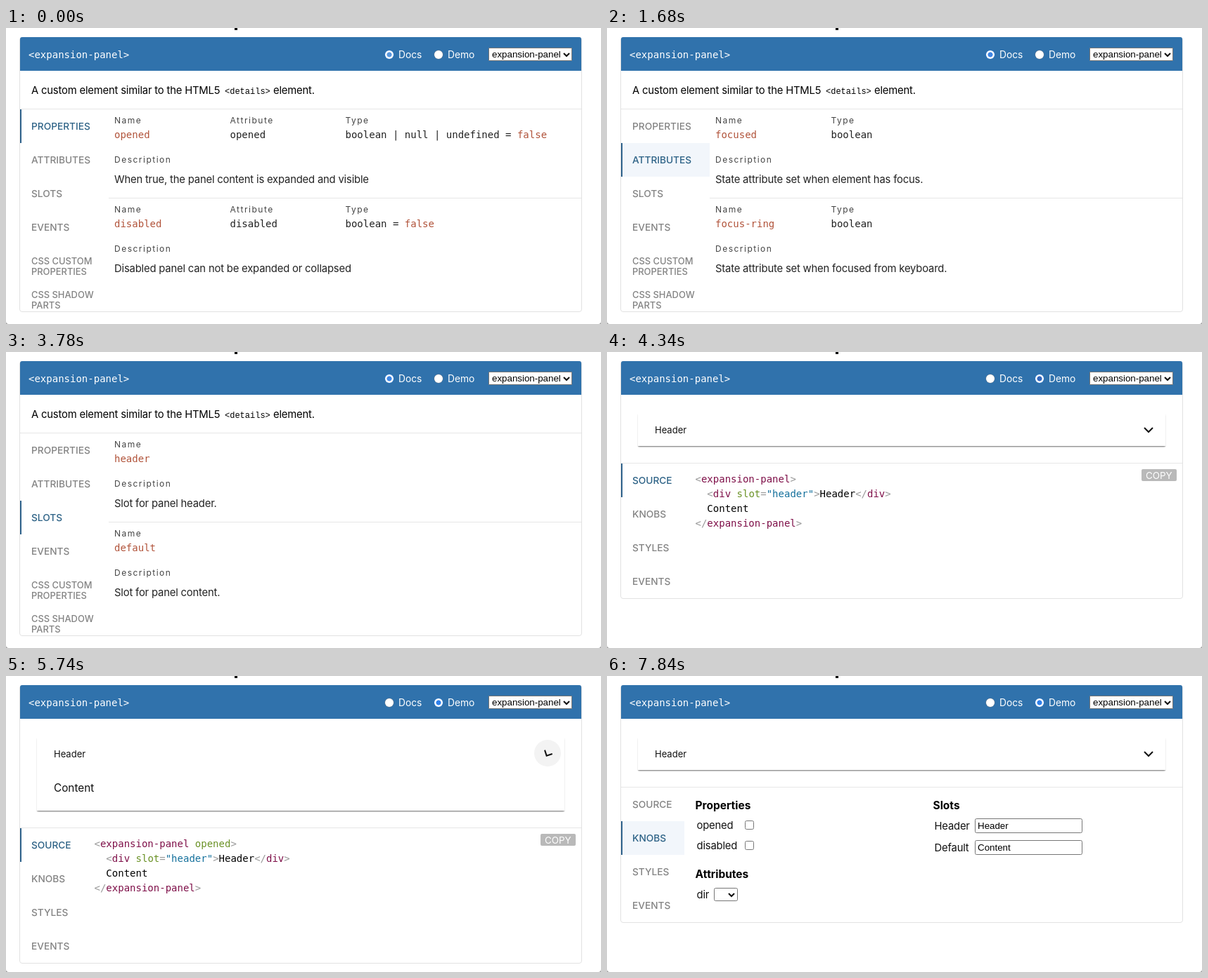
These frames come from a looping animation (846 by 422 pixels, 8 s). An HTML page:

```html
<!DOCTYPE html>
<html lang="en">
<head>
<meta charset="utf-8">
<title>Component docs</title>
<style>
html, body { margin: 0; width: 100%; height: 100%; overflow: hidden; background: #999; }
#stage { position: absolute; left: 0; top: 0; width: 846px; height: 422px; overflow: hidden; background: #fff; border-radius: 0 0 4px 4px; }
#stage * { box-sizing: border-box; }
#stage div, #stage svg { position: absolute; }
.group { left: 0; top: 0; }
.t { white-space: pre; line-height: 20px; font: 400 14.8px/20px Inter, sans-serif; letter-spacing: -.18px; color: #111; }
.mono { font: 14px/20px "DejaVu Sans Mono", monospace; letter-spacing: 0; }
.arial { font: 13.333px/20px "Liberation Sans", Arial, sans-serif; letter-spacing: 0; color: #000; }
.label { font-size: 12px; letter-spacing: 1.5px; color: #444; }
.value { color: #222; }
.name, .name i { color: #b1533a; }
i { font-style: normal; }
.value i { color: #b1533a; }
.tab { font-size: 13.7px; font-weight: 500; letter-spacing: 0; color: #838383; }
.tab.small { font-size: 12.9px; line-height: 15px; }
.tab.on { color: #2d6286; }
.head { font-size: 13.8px; letter-spacing: 0; color: #fff; }
.bold { font-weight: 700; font-size: 15.5px; letter-spacing: 0; color: #000; }
.code { color: #000; line-height: 21px; }
.p { color: #999; } .g { color: #7f1049; } .a { color: #6b9226; } .v { color: #14709c; }
.line { height: 1px; background: #e6e6e6; }
.mark { left: 20px; width: 2px; height: 48px; background: #2f628c; }
.box { border: 1px solid #767676; background: #fff; border-radius: 2.5px; }
.radio { top: 32px; width: 12px; height: 12px; border-radius: 50%; }
#card { left: 19px; top: 13px; width: 800px; border: 1px solid #e2e2e2; border-radius: 4px; }
#bar { left: 20px; top: 13px; width: 798px; height: 48px; background: #3072ac; border-radius: 3px 3px 0 0; }
#panel { left: 44px; top: 88px; width: 750px; box-shadow: 0 2px 2px -1px rgba(0,0,0,.42), 0 1px 1px rgba(0,0,0,.2); }
#ripple { left: 751px; top: 91px; width: 38px; height: 38px; border-radius: 50%; background: #f3f3f3; }
#copy { left: 760px; top: 167px; width: 50px; height: 17px; border-radius: 2px; background: #b9b9b9; }
</style>
</head>
<body>
<div id="stage"></div>
<script>
const stage = document.getElementById('stage');

function el(parent, cls, style = '', html = '') {
  const d = document.createElement('div');
  d.className = cls;
  d.style.cssText = style;
  d.innerHTML = html;
  parent.append(d);
  return d;
}
const esc = s => s.replace(/</g, '&lt;').replace(/>/g, '&gt;');
const rect = (x, y, w, h) => `left:${x}px;top:${y}px;width:${w}px;height:${h}px;`;
const text = (p, x, cy, html, cls = '') => el(p, 't ' + cls, `left:${x}px;top:${cy - 10}px`, html);
const line = (p, x, y) => el(p, 'line', `left:${x}px;top:${y}px;width:${818 - x}px`);
const group = p => el(p, 'group');
const show = (node, on) => { node.style.display = on ? '' : 'none'; };
const chevron = (p, x, y, w, stroke) => {
  const s = document.createElementNS('http://www.w3.org/2000/svg', 'svg');
  s.setAttribute('viewBox', '-12 -12 24 24');
  s.style.cssText = rect(x - 12, y - 12, 24, 24);
  s.innerHTML = `<path d="M${-w} ${-w / 2}L0 ${w / 2}L${w} ${-w / 2}" fill="none" stroke="#111" stroke-width="${stroke}"/>`;
  p.append(s);
  return s;
};

// Column of tabs with hover backgrounds and a selection mark
function tabs(parent, top, width, labels) {
  const g = group(parent);
  const items = labels.map((label, i) => {
    const y = top + i * 48;
    const bg = el(g, '', rect(20, y, width, 48));
    const [a, b] = label.split('\n');
    const parts = b
      ? [text(g, 36, y + 26.5, a + '\n' + b, 'tab small')]
      : [text(g, 36, y + 24, a, 'tab')];
    return { bg, parts };
  });
  const mark = el(g, 'mark');
  return (selected, hover) => {
    mark.style.top = top + selected * 48 + 'px';
    items.forEach(({ bg, parts }, i) => {
      bg.style.background = `rgba(45,110,180,${hover[i] || 0})`;
      parts.forEach(p => p.classList.toggle('on', i === selected));
    });
  };
}

// One documentation entry: labelled columns and a description
function entry(parent, top, cols, description) {
  cols.forEach(([label, value], i) => {
    const x = 154 + i * 164 + (i ? 0.5 : 0);
    text(parent, x, top + 17, label, 'label');
    text(parent, x, top + 37, value, 'mono ' + (i ? 'value' : 'name'));
  });
  text(parent, 154, top + 73, 'Description', 'label');
  text(parent, 154, top + 101, description, 'value');
}
function page(parent, first, second) {
  const g = group(parent);
  entry(g, 115, ...first);
  line(g, 146, 242);
  entry(g, 242, ...second);
  return g;
}

// Frame and header
el(stage, '', rect(325, 0, 4, 3) + 'background:#000');
const card = el(stage, '');
card.id = 'card';
el(stage, '').id = 'bar';
text(stage, 32, 38, esc('<expansion-panel>'), 'mono').style.color = '#fff';
const radios = [538.5, 608.5].map(x => el(stage, 'radio', `left:${x}px`));
text(stage, 558, 38, 'Docs', 'head');
text(stage, 628, 38, 'Demo', 'head');
el(stage, 'box', rect(686, 28, 119, 19) + 'border-radius:1px');
text(stage, 691, 37.5, 'expansion-panel', 'arial');
chevron(stage, 797, 37.5, 4, 2.1);

// Docs view
const docs = group(stage);
text(docs, 36, 89, 'A custom element similar to the HTML5').style.color = '#000';
const tag = text(docs, 311, 91, esc('<details>'));
tag.style.cssText += 'font:12px/20px "Liberation Mono",monospace;letter-spacing:0;color:#000';
text(docs, 380, 89, 'element.').style.color = '#000';
line(docs, 20, 115);
const docTabs = tabs(docs, 116, 126, ['PROPERTIES', 'ATTRIBUTES', 'SLOTS', 'EVENTS', 'CSS CUSTOM\nPROPERTIES', 'CSS SHADOW\nPARTS']);
const pages = [
  page(docs,
    [[['Name', 'opened'], ['Attribute', 'opened'], ['Type', 'boolean | null | undefined = <i>false</i>']],
      'When true, the panel content is expanded and visible'],
    [[['Name', 'disabled'], ['Attribute', 'disabled'], ['Type', 'boolean = <i>false</i>']],
      'Disabled panel can not be expanded or collapsed']),
  page(docs,
    [[['Name', 'focused'], ['Type', 'boolean']], 'State attribute set when element has focus.'],
    [[['Name', 'focus-ring'], ['Type', 'boolean']], 'State attribute set when focused from keyboard.']),
  page(docs,
    [[['Name', 'header']], 'Slot for panel header.'],
    [[['Name', 'default']], 'Slot for panel content.'])
];

// Demo view
const demo = group(stage);
const panel = el(demo, '');
panel.id = 'panel';
text(demo, 68, 111, 'Header').style.cssText += 'font-size:13px;letter-spacing:0';
const content = text(demo, 68, 160, 'Content');
content.style.cssText += 'font-size:15.3px;letter-spacing:0';
const ripple = el(demo, '');
ripple.id = 'ripple';
const arrow = chevron(demo, 770, 110.5, 6, 2);
const lower = group(demo);
line(lower, 20, 158);
const demoTabs = tabs(lower, 159, 90, ['SOURCE', 'KNOBS', 'STYLES', 'EVENTS']);

const source = group(lower);
const span = (cls, s) => `<i class="${cls}">${esc(s)}</i>`;
const codeLine = (i, html) => text(source, 125.5, 181 + i * 21, html, 'mono code');
const openTag = span('p', '<') + span('g', 'expansion-panel');
const firstLine = codeLine(0, '');
codeLine(1, '  ' + span('p', '<') + span('g', 'div') + ' ' + span('a', 'slot') + span('p', '=') +
  span('v', '"header"') + span('p', '>') + 'Header' + span('p', '</') + span('g', 'div') + span('p', '>'));
codeLine(2, '  Content');
codeLine(3, span('p', '</') + span('g', 'expansion-panel') + span('p', '>'));
el(source, '').id = 'copy';
text(source, 766, 175.5, 'COPY').style.cssText += 'font-size:13.4px;letter-spacing:0;color:#fff';

const knobs = group(lower);
text(knobs, 125.5, 184.5, 'Properties', 'bold');
text(knobs, 125.5, 282.5, 'Attributes', 'bold');
text(knobs, 463.5, 184.5, 'Slots', 'bold');
['opened', 'disabled'].forEach((s, i) => {
  text(knobs, 127.5, 213 + i * 29, s);
  el(knobs, 'box', rect(196, 206 + i * 29, 13, 13));
});
text(knobs, 127.5, 312, 'dir');
el(knobs, 'box', rect(152, 302, 34, 19));
chevron(knobs, 176.5, 311.5, 4, 2.1);
[['Header', 'Header'], ['Default', 'Content']].forEach(([label, value], i) => {
  const y = 203 + i * 31;
  text(knobs, 465.5, y + 11, label);
  el(knobs, 'box', rect(523, y, 153, 21));
  text(knobs, 527, y + 10.5, value, 'arial');
});

// Linear value between [time, value] keys
function at(t, keys) {
  let [t0, v0] = keys[0];
  for (const [t1, v1] of keys) {
    if (t < t1) return t <= t0 ? v0 : v0 + (v1 - v0) * (t - t0) / (t1 - t0);
    [t0, v0] = [t1, v1];
  }
  return v0;
}
const hoverAttributes = [[1120, 0], [1260, .06], [1400, .06], [1470, .11], [1540, .13], [1680, .06], [2100, .06], [2310, 0]];
const hoverSlots = [[2170, 0], [2450, .06], [2590, .06], [2730, .13], [2800, .13], [2940, .06], [3150, .06], [3360, 0]];
const hoverKnobs = [[7420, 0], [7560, .06], [7630, .12], [7700, .12], [7840, .06]];
const hoverArrow = [[5530, 0], [5670, 1], [6860, 1], [7070, 0]];
const turn = [[5670, 0], [5740, 27], [5810, 115], [5880, 168], [5950, 180],
  [6580, 180], [6650, 155], [6720, 80], [6790, 0]];

function paintRadio(node, on, color) {
  node.style.background = on ? `radial-gradient(circle, ${color} 3.2px, #fff 3.9px)` : '#fff';
  node.style.boxShadow = on ? '0 0 0 .5px #2f7fe0' : '0 0 0 .5px #68788a';
}

const LOOP = 8000, STEP = 70, LAST = 7840;

function draw(ms) {
  const t = Math.min(Math.floor(ms / STEP) * STEP, LAST);
  const inDemo = t >= 4270;
  const opened = t >= 5740 && t < 6650;
  const docPage = t < 1540 ? 0 : t < 2800 ? 1 : 2;
  const demoPage = t < 7700 ? 0 : 1;

  show(docs, !inDemo);
  show(demo, inDemo);
  card.style.height = (inDemo ? (opened ? 397 : 339) : 392) + 'px';
  paintRadio(radios[0], !inDemo, t < 140 ? '#5a97dc' : '#3f86e4');
  paintRadio(radios[1], inDemo, t < 4830 ? '#3467bd' : '#2f80ea');

  docTabs(docPage, [0, at(t, hoverAttributes), at(t, hoverSlots)]);
  pages.forEach((p, i) => show(p, i === docPage));

  panel.style.height = (opened ? 104 : 46) + 'px';
  show(content, opened);
  lower.style.top = (opened ? 58 : 0) + 'px';
  ripple.style.opacity = at(t, hoverArrow);
  arrow.style.transform = `rotate(${at(t, turn)}deg)`;
  demoTabs(demoPage, [0, at(t, hoverKnobs)]);
  show(source, demoPage === 0);
  show(knobs, demoPage === 1);
  const html = openTag + (opened ? ' ' + span('a', 'opened') : '') + span('p', '>');
  if (firstLine.dataset.opened !== String(opened)) {
    firstLine.innerHTML = html;
    firstLine.dataset.opened = opened;
  }
}

const start = performance.now();
function tick() {
  draw((performance.now() - start) % LOOP);
  requestAnimationFrame(tick);
}
tick();
</script>
</body>
</html>
```
